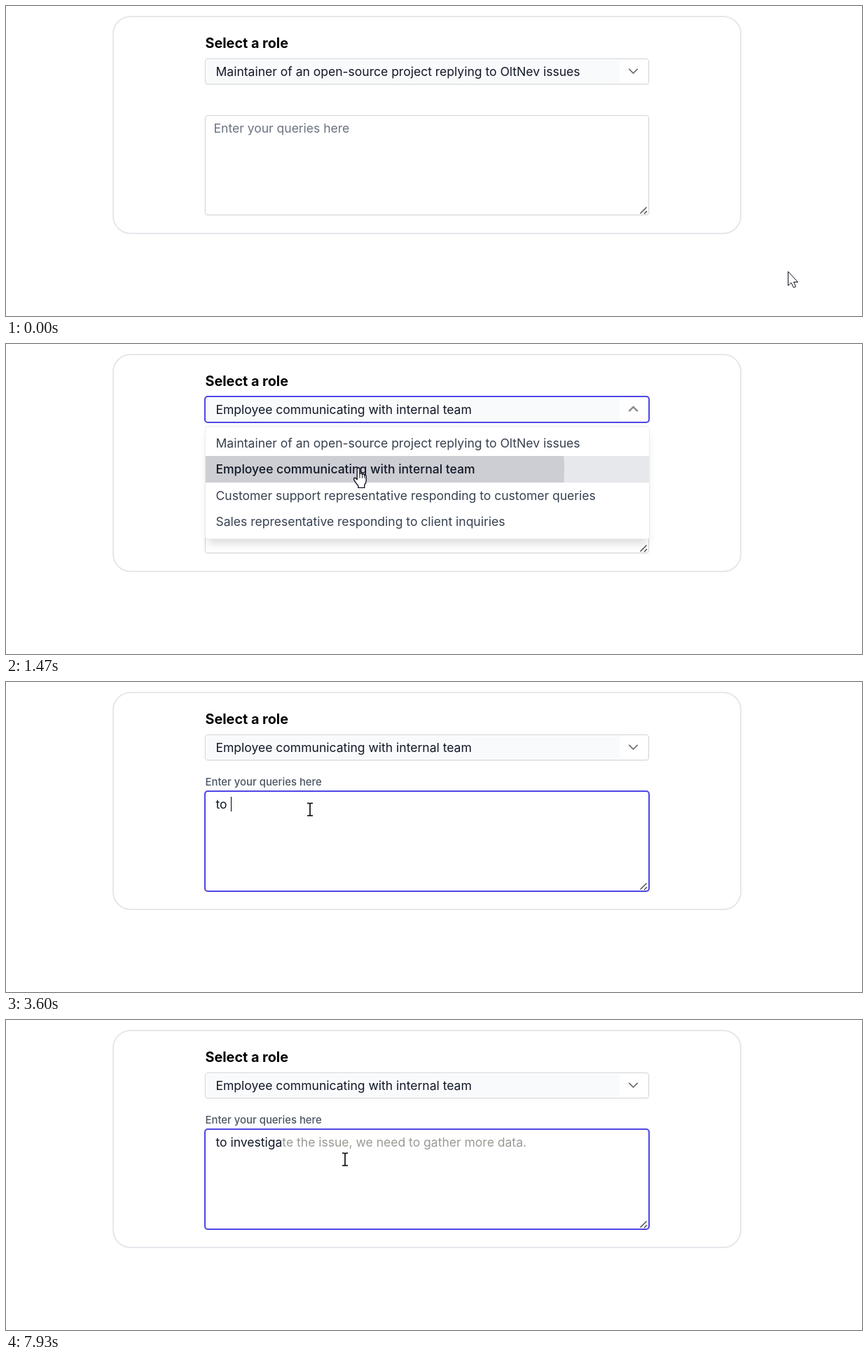
Write an HTML page that moves like this. It is 1222 px wide and 443 px high and loops after 8 s.

```html
<!DOCTYPE html>
<html lang="en">
<head>
<meta charset="utf-8">
<title>Role picker</title>
<style>
  html, body { margin: 0; width: 100%; height: 100%; overflow: hidden; background: #fff; }
  svg { display: block; width: 1222px; height: 443px; }
  text { font: 400 17.52px Inter, sans-serif; white-space: pre; fill: #111827; }
  .row { fill: #374151; }
  .row.on { font-weight: 500; fill: #111827; }
  .box { fill: #fff; stroke: #d1d5db; filter: drop-shadow(0 1px 1px #0000000d); }
</style>
</head>
<body>
<svg viewBox="0 0 1222 443">
  <defs>
    <clipPath id="rowClip"><rect x="285" y="160" width="633" height="38"/></clipPath>
  </defs>
  <rect x="153" y="15" width="896" height="310" rx="25" fill="#fff" stroke="#e5e7eb" stroke-width="2"/>
  <text x="284.5" y="60" style="font-size:19.8px;font-weight:700;fill:#000">Select a role</text>

  <rect class="box" x="284.5" y="75.5" width="633" height="36" rx="3.5"/>
  <rect class="box" x="284.5" y="156.5" width="633" height="142" rx="3.5"/>
  <rect x="286" y="77" width="590" height="33" rx="2" fill="#f9fafb"/>
  <rect id="ring" x="284" width="634" rx="4" fill="none" stroke="#4f46e5" stroke-width="2"/>
  <text id="value" x="299.5" y="100"></text>
  <path id="chevron" d="M-6.2-3.1 0 3.1 6.2-3.1" fill="none"/>

  <path d="M905.5 296.5l9-9M911 297l4-4" stroke="#444" stroke-width="1.4"/>
  <text id="label">Enter your queries here</text>
  <text x="299.5" y="181"><tspan id="typed"></tspan><tspan id="ghost" fill="#9a9a94">te the issue, we need to gather more data.</tspan></text>
  <path id="squiggle" fill="none" stroke="#f33" stroke-width="1.2"/>
  <rect id="caret" y="164" width="1" height="21" fill="#000"/>

  <g id="menu">
    <rect x="288" y="128" width="627" height="157" fill="#00000024" style="filter:blur(6px)"/>
    <rect x="284.5" y="117.5" width="634" height="161" rx="3" fill="#fff" stroke="#ebecef"/>
    <rect id="hover" x="285" width="633" height="38" fill="#e7e8ec"/>
    <circle id="ripple" cx="505" cy="179" fill="#cdced3" clip-path="url(#rowClip)"/>
    <g id="rows"></g>
  </g>

  <g stroke-linejoin="round">
    <path id="arrow" d="M.5.5V20.5L5 16.5 8.5 23.5 11.5 22 8.5 15.5H14.5Z" fill="#fff" stroke="#112"/>
    <g id="hand">
      <path d="M5 17V2.5Q5 .7 6.8.7 8.5.7 8.5 2.5V9Q11.5 7.4 12 10 14.3 8.8 15 11 17 10.3 17.3 12.5V18Q17.3 22 15 24V28H6.5V25Q4 23 .9 17.5-.2 15 1.8 14.5 3.5 14.5 5 17Z" fill="#fff" stroke="#112" stroke-width="1.3"/>
      <path d="M8.5 9V15M12 10V15M15 11V15" stroke="#112"/>
    </g>
    <path id="beam" d="M-4 .7H-1.5Q0 .7 0 2 0 .7 1.5.7H4M0 1V18.5M-4 18.5H4" fill="none" stroke="#000" stroke-width="1.6"/>
  </g>
</svg>
<script>
const $ = id => document.getElementById(id);
const roles = [
  'Maintainer of an open-source project replying to OltNev issues',
  'Employee communicating with internal team',
  'Customer support representative responding to customer queries',
  'Sales representative responding to client inquiries'
];
const words = 'to investiga';
const keyTimes = [3070, 3270, 3600, 3800, 4000, 4200, 4330, 4600, 4870, 5130, 5270, 5600];
// Pointer hot spots: time, x, y
const stops = [[0, 1116, 379], [40, 1116, 379], [470, 531, 95], [670, 531, 95], [730, 536, 95],
  [1270, 503, 176], [1530, 503, 176], [2060, 434, 182], [7240, 434, 182], [7930, 484, 199], [8000, 484, 199]];

const rows = roles.map((role, i) => {
  const row = document.createElementNS('http://www.w3.org/2000/svg', 'text');
  row.setAttribute('x', 299.5);
  row.setAttribute('y', 148 + 37.4 * i);
  row.textContent = role;
  return $('rows').appendChild(row);
});

const set = (id, attrs) => { for (const k in attrs) $(id).setAttribute(k, attrs[k]); };
const show = (id, on) => set(id, { visibility: on ? 'visible' : 'hidden' });
const move = (id, x, y, extra = '') => set(id, { transform: `translate(${x} ${y})${extra}` });
const part = (t, a, b) => Math.min(1, Math.max(0, (t - a) / (b - a)));
const smooth = p => p * p * (3 - 2 * p);
const mix = (a, b, p) => a + (b - a) * p;

function pointer(t) {
  const i = Math.max(1, stops.findIndex(s => s[0] > t));
  const [a, b] = [stops[i - 1], stops[i]];
  const p = smooth(part(t, a[0], b[0]));
  return [mix(a[1], b[1], p), mix(a[2], b[2], p)];
}

function draw(t) {
  const open = t >= 670 && t < 1530;
  const picked = t >= 1400 ? 1 : 0;
  const focused = t >= 2130;

  $('value').textContent = roles[picked];
  show('ring', t >= 670);
  set('ring', focused ? { y: 156, height: 143 } : { y: 75, height: 37 });

  const turn = 180 * (smooth(part(t, 650, 850)) - smooth(part(t, 1510, 1710)));
  move('chevron', 895.5, 93, ` rotate(${turn})`);
  set('chevron', { stroke: open ? '#8b8b8b' : '#6b7068', 'stroke-width': open ? 2.4 : 1.7 });

  set('menu', { display: open ? 'inline' : 'none' });
  set('hover', { y: t < 1130 ? 122.5 : 160 });
  set('ripple', { r: 292 * part(t, 1270, 1470) });
  rows.forEach((row, i) => row.setAttribute('class', i === picked ? 'row on' : 'row'));

  const rise = smooth(part(t, 2110, 2390));
  move('label', mix(296.5, 284.5, rise), mix(181, 148, rise), ` scale(${mix(1, .85, rise)})`);
  $('label').style.fontWeight = focused ? 500 : 400;
  $('label').style.fill = t < 2300 ? '#6b7280' : '#4b5563';

  $('typed').textContent = words.slice(0, keyTimes.filter(k => t >= k).length);
  const end = 299.5 + $('typed').getComputedTextLength();
  const reset = Math.max(2200, ...[...keyTimes, 7130].filter(k => k <= t));
  show('caret', t >= 2200 && Math.floor((t - reset) / 530) % 2 === 0);
  set('caret', { x: Math.round(end) });
  set('ghost', { display: t >= 7070 ? 'inline' : 'none' });

  let wave = 'M320 186';
  for (let x = 322, up = 1; x < end; x += 2, up = !up) wave += `L${x} ${up ? 184.5 : 186}`;
  set('squiggle', { d: wave });
  show('squiggle', t >= 6600 && t < 7070);

  const [x, y] = pointer(t);
  const kind = t >= 1530 ? 'beam' : y < 112 || open ? 'hand' : 'arrow';
  for (const id of ['arrow', 'hand', 'beam']) show(id, id === kind);
  if (kind === 'beam') move('beam', x, y - 9.5);
  else if (kind === 'hand') move('hand', x - 7, y, ' scale(1.05)');
  else move('arrow', x, y);
}

function tick(now) {
  draw(now % 8000);
  requestAnimationFrame(tick);
}
draw(0);
requestAnimationFrame(tick);
</script>
</body>
</html>
```
